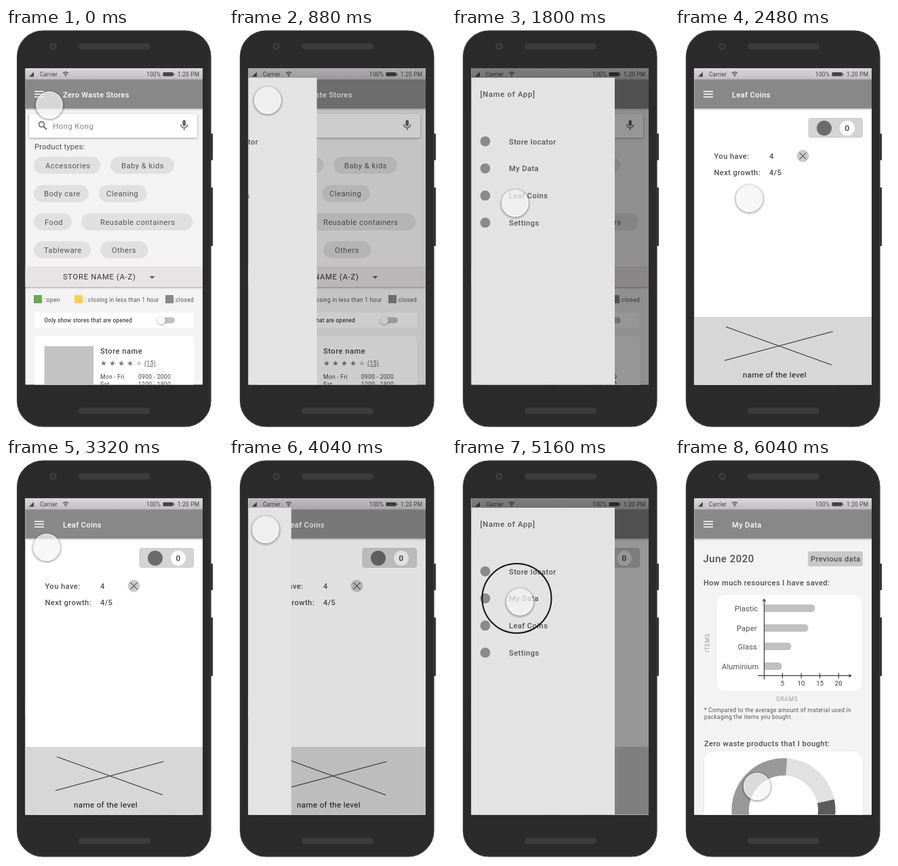
Write an HTML page that moves like this. It is 320 px wide and 590 px high and loops after 6.08 s.

```html
<!DOCTYPE html>
<html lang="en">
<head>
<meta charset="utf-8">
<style>
html, body { margin: 0; width: 100%; height: 100%; overflow: hidden; background: #fff; }
svg { display: block; }
text { font-family: Roboto, "Open Sans", sans-serif; white-space: pre; }
.m { font-weight: 500; }
.shadow { filter: drop-shadow(0 1px 1.5px rgba(0,0,0,.36)); }
</style>
</head>
<body>
<svg id="stage" width="320" height="590" viewBox="0 0 320 590"></svg>
<script>
const DURATION = 6080, DRAWER_WIDTH = 211;

const rect = (x, y, w, h, fill, r = 0, extra = '') =>
  `<rect x="${x}" y="${y}" width="${w}" height="${h}" rx="${r}" fill="${fill}" ${extra}/>`;
const dot = (x, y, r, fill, extra = '') => `<circle cx="${x}" cy="${y}" r="${r}" fill="${fill}" ${extra}/>`;
const path = (d, stroke = '#222', width = 1, fill = 'none') =>
  `<path d="${d}" stroke="${stroke}" stroke-width="${width}" fill="${fill}"/>`;
const text = (x, y, s, size = 11.2, fill = '#505050', gap = .4, extra = '') =>
  `<text x="${x}" y="${y}" font-size="${size}" fill="${fill}" letter-spacing="${gap}" ${extra}>${s}</text>`;
const bold = (x, y, s, size, fill, gap) => text(x, y, s, size, fill, gap, 'class="m"');
const group = (id, body, extra = '') => `<g id="${id}" ${extra}>${body}</g>`;

const page = (title, bg, body) =>
  rect(28, 59, 262, 465, bg) + body +
  rect(28, 75, 262, 43, '#888', 0, 'class="shadow"') +
  path('M42 93.3h14M42 97.3h14M42 101.3h14', '#fff', 1.6) +
  bold(84, 101.5, title, 11.2, '#fff', .35) +
  rect(28, 59, 262, 16.5, 'url(#bar)') +
  path('M34 71.5h7v-7z', 'none', 0, '#444') +
  text(50, 70.8, 'Carrier', 8.4, '#444', .15) +
  path('M84 66.3q4-3.4 8 0M85.8 68.4q2.2-1.9 4.4 0', '#444', 1.2) + dot(88, 70.2, 1, '#444') +
  text(207, 70.8, '100%', 8.4, '#444', .2) +
  rect(231.5, 65, 15, 5.8, '#444', 1) + rect(247, 66.6, 1.3, 2.6, '#444') +
  text(253, 70.8, '1:20 PM', 8.4, '#444', .2);

const chip = (x, y, w, tx, label) =>
  rect(x, y, w, 25, '#e0e0e0', 12.5) + text(tx, y + 16.5, label, 11.2, '#555', .5);

const star = (x, y, fill) => {
  const points = Array.from({length: 10}, (_, i) => {
    const r = i % 2 ? 1.8 : 4.3, a = i * Math.PI / 5;
    return `${x + r * Math.sin(a)},${y - r * Math.cos(a)}`;
  });
  return `<polygon points="${points.join(' ')}" fill="${fill}"/>`;
};

const stores = page('Zero Waste Stores', '#f3f3f3',
  rect(34, 126, 248, 35, '#fff', 1, 'class="shadow"') +
  path('M60 149l-4.8-4.8', '#666', 1.8) + dot(52.5, 141.5, 3.9, 'none', 'stroke="#666" stroke-width="1.6"') +
  text(69, 147.5, 'Hong Kong', 11.6, '#888', .3) +
  rect(260.4, 135, 4.6, 9, '#666', 2.3) + path('M257.8 141.5a4.9 4.9 0 0 0 9.8 0M262.7 146.5v3.5', '#666', 1.4) +
  text(42, 177.5, 'Product types:', 11.3, '#505050', .15) +
  chip(41, 189, 98, 58, 'Accessories') + chip(154, 189, 94, 170, 'Baby &amp; kids') +
  chip(41, 230.5, 81, 56, 'Body care') + chip(137, 230.5, 70.5, 148, 'Cleaning') +
  chip(41, 272, 56, 57, 'Food') + chip(111, 272, 164.5, 139, 'Reusable containers') +
  chip(41, 313, 84, 56, 'Tableware') + chip(139, 313, 70.5, 156, 'Others') +
  rect(28, 351, 262, 29, '#e6e4e5', 0, 'class="shadow"') +
  text(84, 369, 'STORE NAME (A-Z)', 11.2, '#333', .72) +
  path('M211.5 364h8l-4 4.2z', 'none', 0, '#666') +
  rect(41, 392, 12, 12, '#6aaa50') + text(55, 401.7, ': open', 8.5, '#555', .22) +
  rect(101, 392, 12, 12, '#ffcf50') + text(116.5, 401.7, ': closing in less than 1 hour', 8.5, '#555', .22) +
  rect(235, 392, 12, 12, '#888') + text(248, 401.7, ':closed', 8.5, '#555', .3) +
  rect(42, 417.5, 235, 22.5, '#fff', 3) +
  bold(56.5, 432, 'Only show stores that are opened', 8.2, '#444', .23) +
  rect(224, 424.5, 25, 9, '#c2c2c2', 4.5) + dot(229, 429, 6, '#fafafa', 'class="shadow"') +
  rect(42, 452, 235, 90, '#fff', 6) + rect(56.5, 467, 72.5, 70, '#c3c3c3') +
  bold(139, 478, 'Store name', 11.2, '#444', .5) +
  [0, 1, 2, 3, 4].map(i => star(144 + 13 * i, 492.3, i < 4 ? '#808080' : '#ccc')).join('') +
  text(204, 495.2, '(15)', 9, '#555', .2, 'text-decoration="underline"') +
  text(139, 514.5, 'Mon - Fri', 8.6, '#444', .25) + text(195, 514.5, '0900 - 2000', 8.6, '#444', .25) +
  text(139, 526, 'Sat', 8.6, '#444', .25) + text(195, 526, '1200 - 1800', 8.6, '#444', .25));

const leaf = page('Leaf Coins', '#fff',
  rect(197, 132.5, 79.5, 28, '#d4d4d4', 3, 'stroke="#c4c4c4" stroke-width=".8"') +
  dot(220, 147, 11, '#6b6b6b') + dot(254, 147, 11, '#fff') + bold(250.6, 151.2, '0', 11.6, '#333', 0) +
  bold(57.5, 191.5, 'You have:') + bold(139, 191.5, '4') +
  dot(188.5, 187.8, 9, '#cbcbcb') + path('M183.5 182.8l10 10m0-10l-10 10') +
  bold(57.5, 216, 'Next growth:') + bold(139, 216, '4/5') +
  rect(28, 424, 262, 100, '#d7d7d7') +
  path('M75 438.5L231 494.5M73 488L232.5 445.5') +
  text(100, 513, 'name of the level', 11.6, '#111', .35));

const bar = (y, end, tx, label) =>
  path(`M132 ${y}H${end - 5}a5 5.5 0 0 1 0 11H132z`, 'none', 0, '#c1c1c1') +
  text(tx, y + 9.6, label, 11.2, '#505050', .1);

// Donut slice, angles in degrees clockwise from the top
const slice = (from, to, fill) => {
  const at = (r, deg) => {
    const a = deg * Math.PI / 180;
    return `${160 + r * Math.sin(a)} ${517 - r * Math.cos(a)}`;
  };
  const big = +(to - from > 180);
  return path(`M${at(76.5, from)}A76.5 76.5 0 ${big} 1 ${at(76.5, to)}L${at(51, to)}A51 51 0 ${big} 0 ${at(51, from)}z`,
    'none', 0, fill);
};

const edge = 'stroke="#e6e6e6" stroke-width=".8"';
const data = page('My Data', '#f3f3f3',
  bold(41.5, 153, 'June 2020', 15, '#505050', .5) +
  rect(196, 137, 81, 22, '#c8c8c8', 3) + bold(200, 152, 'Previous data') +
  bold(42, 186.5, 'How much resources I have saved:') +
  rect(60.5, 199.5, 216, 143.5, '#fff', 14, edge) +
  bar(215, 206.5, 88, 'Plastic') + bar(244, 196.5, 91, 'Paper') +
  bar(271, 171.5, 92.5, 'Glass') + bar(300, 157.5, 69, 'Aluminium') +
  path('M131.5 325V207m-2.5 4l2.5-4l2.5 4M122 319.5H260m-4-2.5l4 2.5l-4 2.5') +
  [5, 10, 15, 20].map((n, i) => path(`M${158.5 + 27.6 * i} 315.5v8`) +
    text(158.5 + 27.6 * i, 333.5, n, 9.5, '#333', .2, 'text-anchor="middle"')).join('') +
  text(0, 0, 'ITEMS', 8.4, '#999', .7, 'transform="translate(51 285) rotate(-90)"') +
  text(149, 357, 'GRAMS', 8.4, '#999', .7) +
  text(43, 372.5, '* Compared to the average amount of material used in', 8.4, '#555', .3) +
  text(43, 382.5, 'packaging the items you bought.', 8.4, '#555', .3) +
  bold(43, 422.5, 'Zero waste products that I bought:') +
  rect(42.5, 430, 234.5, 130, '#fff', 14, edge) +
  slice(4, 78, '#e1e1e1') + slice(78, 200, '#5c5c5c') + slice(200, 364, '#999'));

const drawer = rect(28, 73, DRAWER_WIDTH + 1, 451, '#e3e3e3') +
  bold(41.5, 101, '[Name of App]', 11.2, '#555', .75) +
  ['Store locator', 'My Data', 'Leaf Coins', 'Settings'].map((s, i) =>
    dot(49, 166.3 + 39.8 * i, 7.4, '#8a8a8a') + bold(84, 170.5 + 39.8 * i, s, 11.2, '#555')).join('');

const phone =
  rect(300, 155, 5, 39, '#333', 1) + rect(300, 234, 5, 86, '#333', 1) +
  rect(16.5, 4, 285.5, 581, '#2b2b2b', 38, 'stroke="#3c3c3c" stroke-width="1.2"') +
  rect(107, 22.5, 106, 9, '#3c3c3c', 4.5) + rect(107, 557.5, 106, 9, '#3c3c3c', 4.5) +
  dot(69.5, 27, 5.2, '#3e3e3e') + dot(69.5, 27, 2.6, '#2e2e2e');

// The shadow is a soft ring, so it does not darken the translucent disc
const cursorBody = dot(0, 1, 23.5, 'url(#halo)') +
  dot(0, 0, 19.3, 'rgba(244,244,244,.72)', 'stroke="rgba(255,255,255,.75)" stroke-width="1.4"');

const $ = id => document.getElementById(id);
$('stage').innerHTML =
  `<defs>
    <linearGradient id="bar" x2="0" y2="1"><stop stop-color="#dbd9db"/><stop offset="1" stop-color="#bfbdbf"/></linearGradient>
    <radialGradient id="halo">
      <stop offset=".8" stop-opacity="0"/><stop offset=".82" stop-opacity=".28"/><stop offset="1" stop-opacity="0"/>
    </radialGradient>
    <clipPath id="clip"><rect x="28.5" y="59" width="261.5" height="464.5"/></clipPath>
  </defs>` + phone +
  group('screen',
    group('stores', stores) + group('leaf', leaf) + group('data', data) +
    group('overlay',
      group('scrim', rect(28, 59, 262, 465, '#000')) + group('drawer', drawer) +
      group('ring', dot(95.5, 206, 51, 'none', 'stroke="#111" stroke-width="2"'))) +
    group('cursor', cursorBody),
    'clip-path="url(#clip)"');

// time, x, y
const trail = [
  [0, 64, 113], [600, 57, 106], [1300, 57, 106], [1800, 93, 257], [1920, 100, 252],
  [2560, 110, 250], [2800, 110, 250], [3320, 60, 131], [3700, 54, 105], [4520, 54, 105],
  [5120, 100, 211], [5300, 101, 210], [5800, 108, 192], [6040, 121, 482], [6080, 121, 482]
];

const clamp = v => Math.min(1, Math.max(0, v));
const ease = v => .5 - .5 * Math.cos(Math.PI * clamp(v));
const ramp = (t, start, length) => ease((t - start) / length);

function draw(t) {
  const toLeaf = ramp(t, 2000, 320), toData = ramp(t, 5320, 320);
  const second = t > 2600;
  const open = ramp(t, second ? 3894 : 687, 400);

  // The drawer lies above the page being left and below the page coming in
  $('screen').insertBefore($('overlay'), second ? $('data') : $('leaf'));
  $('leaf').setAttribute('opacity', toLeaf);
  $('data').setAttribute('opacity', toData);
  $('scrim').setAttribute('opacity', .41 * open);
  $('drawer').setAttribute('transform', `translate(${DRAWER_WIDTH * (open - 1)} 0)`);
  $('drawer').setAttribute('opacity', +(open > 0));
  $('ring').setAttribute('opacity', +(t >= 5040));

  const i = trail.findIndex(k => k[0] > t);
  const [t0, x0, y0] = trail[i - 1], [t1, x1, y1] = trail[i];
  const p = ramp(t, t0, t1 - t0);
  $('cursor').setAttribute('transform', `translate(${x0 + (x1 - x0) * p} ${y0 + (y1 - y0) * p})`);
}

const start = performance.now();
function tick() {
  draw((performance.now() - start) % DURATION);
  requestAnimationFrame(tick);
}
tick();
</script>
</body>
</html>
```
